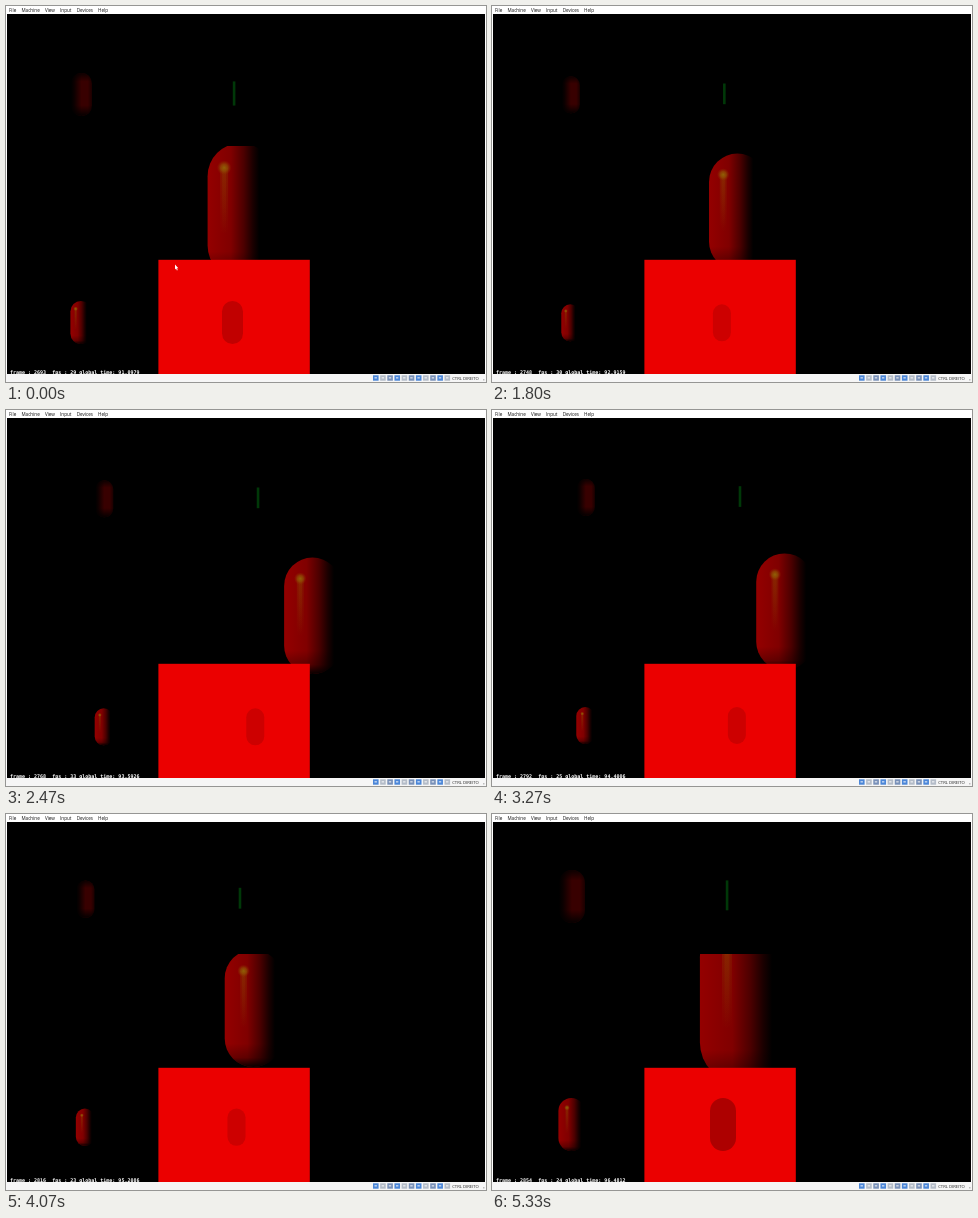
An HTML page with a canvas that plays this animation: 480x376 px, repeating every 5390 ms.

```html
<!DOCTYPE html>
<html>
<head>
<meta charset="utf-8">
<style>
html, body { margin: 0; width: 480px; height: 376px; overflow: hidden; background: #fff }
canvas { display: block }
</style>
</head>
<body>
<canvas id="stage" width="480" height="376"></canvas>
<script>
const ctx = document.getElementById('stage').getContext('2d');
const LOOP = 5390, STEP = 200 / 3, ZOOM = 3.15;

// Smooth 0..1 ramp between two times
function ease(t, from, to) {
  const u = Math.min(1, Math.max(0, (t - from) / (to - from)));
  return u * u * (3 - 2 * u);
}

// The camera drifts away, swings left and back, then comes closer
function pose(t) {
  const away = ease(t, 1070, 1800), near = ease(t, 4000, 5000);
  const w = 21 - 3 * away + 8 * near;
  return {
    x: 216 + 24.7 * ease(t, 1500, 2550) - 22.7 * ease(t, 2750, 4500),
    y: 295 + 3.3 * away - 3.6 * ease(t, 2700, 4100) - 10.7 * near,
    w,
    h: 2 * w + 1,
    lit: .78 + .1 * ease(t, 1800, 2470),
    shine: .25 + .08 * ease(t, 1800, 3270),
    ridge: 1.5 + 2.5 * t / LOOP
  };
}

function rect(color, x, y, w, h) {
  ctx.fillStyle = color;
  ctx.fillRect(x, y, w, h);
}

function text(str, x, y, font, color) {
  ctx.font = font;
  ctx.fillStyle = color;
  ctx.fillText(str, x, y);
}

function gradient(x0, y0, x1, y1, stops) {
  const g = ctx.createLinearGradient(x0, y0, x1, y1);
  stops.forEach(([at, color]) => g.addColorStop(at, color));
  return g;
}

function pill(fill, x, y, w, h) {
  ctx.fillStyle = fill;
  ctx.beginPath();
  ctx.roundRect(x, y, w, h, w / 2);
  ctx.fill();
}

function litPill(x, y, w, h, lit, shine) {
  ctx.save();
  pill(gradient(x, 0, x + w * lit, 0, [
    [0, '#940000'], [.45, '#800000'], [.7, '#4c0000'], [.88, '#1a0000'], [1, '#000']
  ]), x, y, w, h);
  ctx.clip();
  rect(gradient(0, y + h * .8, 0, y + h, [[0, '#0000'], [.6, '#0004'], [1, '#000e']]), x, y, w, h);

  const sx = x + w * shine, sy = y + w * .37, r = w * .11;
  const streak = gradient(0, sy, 0, sy + w, [[0, '#8a480050'], [1, '#8a480000']]);
  rect(streak, sx - w * .06, sy, w * .12, w);
  rect(streak, sx - w * .03, sy, w * .06, w);
  const glow = ctx.createRadialGradient(sx, sy, 0, sx, sy, r);
  glow.addColorStop(0, '#906006');
  glow.addColorStop(.5, '#905004b0');
  glow.addColorStop(1, '#90300000');
  rect(glow, sx - r, sy - r, 2 * r, 2 * r);
  ctx.restore();
}

function scene(t) {
  const { x, y, w, h, lit, shine, ridge } = pose(t);

  ctx.save();
  ctx.beginPath();
  ctx.rect(1, 140, 478, 228);
  ctx.clip();
  litPill(ZOOM * (x - 152), 8 + ZOOM * (y - 254), w * ZOOM, h * ZOOM, lit, shine);
  ctx.restore();

  // depth view
  rect('#eb0000', 152.4, 253.8, 151.4, 114.2);
  pill(`rgb(${205 - (w - 18) * 4},0,0)`, x, y, w, h);

  litPill(x - 151.6, y, w, h, lit, shine);

  // normals view
  const nx = x - 151, ny = y - 228;
  pill(gradient(nx, 0, nx + w, 0, [
    [0, '#000'], [.15, '#0c0000'], [.5, '#380000'], [.8, '#380000'], [1, '#1a0000']
  ]), nx, ny, w, h);
  pill(gradient(0, ny, 0, ny + h, [
    [0, '#000c'], [.2, '#0000'], [.75, '#0000'], [1, '#000e']
  ]), nx, ny, w, h);

  rect('#003808', x + w / 2 + ridge - 1.2, ny + w * .4, 2.6, w * 1.15);
}

function stats(t) {
  const s = t / 1000, fps = Math.round(29 + 6 * Math.sin(t * t));
  text(`frame : ${Math.round(2693 + 30.3 * s)}  fps : ${fps} global time: ${(91.0979 + 1.01 * s).toFixed(4)}`,
    4, 368, 'bold 5px "DejaVu Sans Mono", monospace', '#fff');
}

function pointer(t) {
  if (t >= 1065) return;
  const u = Math.min(1, t / 330);
  ctx.save();
  ctx.translate(169 + 71 * u, 258.5 - 71 * u);
  ctx.scale(.8, .8);
  ctx.fillStyle = '#fff';
  ctx.fill(new Path2D('M0 0V6.2L1.4 5 2.4 7.4 3.4 7 2.4 4.6H4.2Z'));
  ctx.restore();
}

function chrome() {
  rect('#fff', 0, 0, 480, 376);
  rect('#f6f6f6', 0, 368, 480, 8);
  rect('#000', 1, 8, 478, 360);

  let x = 3;
  for (const name of ['File', 'Machine', 'View', 'Input', 'Devices', 'Help']) {
    text(name, x, 5.8, '4.6px "Open Sans", sans-serif', '#111');
    x += ctx.measureText(name).width + 5.2;
  }

  const colors = ['#4b86d8', '#b4bcc8', '#7890b8'];
  for (let i = 0; i < 11; i++) {
    const ix = 367 + i * 7.15;
    rect(colors[i % 3], ix, 369.3, 5.6, 5.4);
    rect('#fff9', ix + 1.5, 371, 2.4, 1.6);
  }
  text('CTRL DIREITO', 446.2, 373.8, '4.2px "Open Sans", sans-serif', '#222');
  rect('#bbb', 477, 373, 1.5, 1.5);
}

function draw() {
  const n = Math.floor((performance.now() % LOOP + 3.4) / STEP);
  const t = Math.round(n * STEP / 10) * 10;
  chrome();
  scene(t);
  stats(t);
  pointer(t);
  requestAnimationFrame(draw);
}
draw();
</script>
</body>
</html>
```
